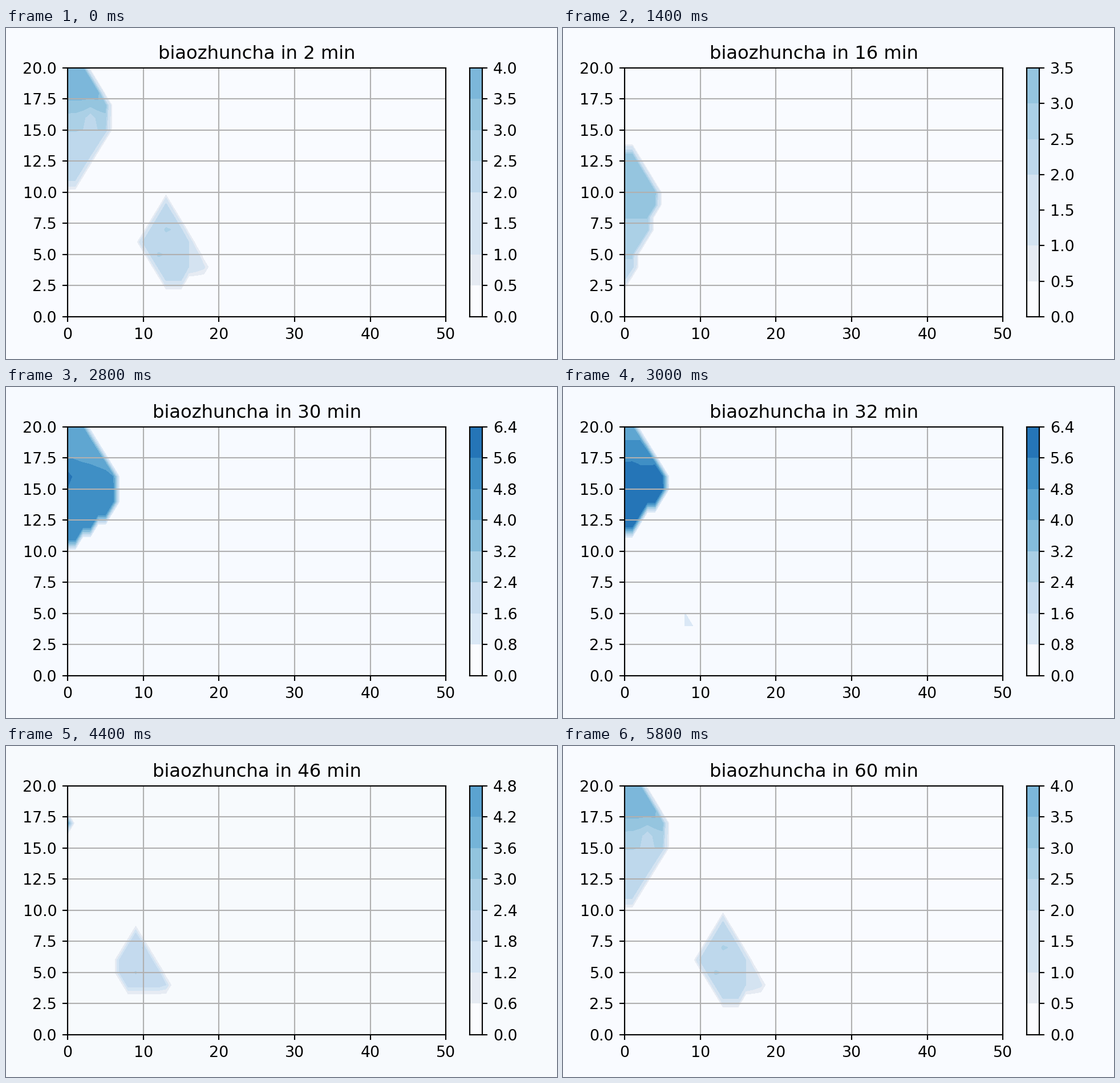
Write a matplotlib script that moves like this. It is 966x580 px and loops after 6000 ms.

```python
import numpy as np
import matplotlib.pyplot as plt
from matplotlib.animation import FuncAnimation
from matplotlib.ticker import MaxNLocator

W, H, DPI = 966, 580, 193.2
FRAMES, INTERVAL = 30, 200
VMAX = 8.2
BACKS = {0.5: "#f9fbff", 0.6: "#f7fafd", 0.8: "#f7faff"}

X, Y = np.meshgrid(np.arange(51), np.arange(21))

# minute: top, cap, bottom, slope, low, high, power, tilt, bump, bump x
WALL = {
    2: (22, 5, 10, 1, 2.1, 3.85, 3, 0, -0.7, 3),
    16: (14, 4, 2.38, 0.65, 1.8, 3.3, 0.6, 0, 0, 3),
    24: (22, 6, 8.85, 1.6, 3.3, 3.75, 2, 0.08, 0, 0),
    30: (22, 6, 10.5, 2, 5.5, 4.3, 4, -0.06, 0.7, 0),
    38: (19, 2, 14, 1, 4.5, 2.9, 1, 0.2, 0.5, 2),
    46: (18, 0, 16, 1, 4.3, 4.3, 1, 0, 0, 2),
}
# minute: left tip, its height, right diagonal, bottom, strength, ripple
DRIFT = {
    2: (10, 6, 22, 2.5, 2.2, 0.45),
    10: (7.5, 4.5, 13, 3.5, 0, 0),
    38: (7.5, 4.5, 13, 3.5, 0.9, 0),
    46: (6.5, 5.5, 17, 3.2, 2.2, 0.25),
}
for keys in (WALL, DRIFT):
    keys[60] = keys[2]


def at(keys, minute):
    return [np.interp(minute, list(keys), col) for col in zip(*keys.values())]


def wall_cloud(minute):
    """Cloud on the left edge: a capped wedge whose values rise with height."""
    top, cap, bottom, slope, low, high, power, tilt, bump, bx = at(WALL, minute)
    width = np.minimum(np.minimum(top - Y, cap), slope * (Y - bottom))
    inside = (Y > bottom) & (Y < top) & (X <= width + 1e-6)
    rise = np.clip((Y - bottom) / 8, 0, 1) ** power
    spot = bump * np.exp(-((X - bx) ** 2 + (Y - 16) ** 2) / 0.7)
    return inside * (low + (high - low) * rise + tilt * X + spot)


def drift_cloud(minute):
    """Free cloud: pointed on the left, cut by a diagonal on the right."""
    left, mid, diagonal, bottom, strength, ripple = at(DRIFT, minute)
    right = np.minimum(diagonal - Y, left + 2.5 + 5 * (Y - bottom))
    inside = ((Y > bottom) & (X >= left + abs(Y - mid) - 1e-6)
              & (X <= right + 1e-6))
    ridge = np.exp(-(X - left - 2.6 - 0.5 * (Y - 5.5)) ** 2)
    wave = ripple * ridge * np.cos(np.pi * (Y - 5.2) / 2) ** 2
    taper = 0.4 * np.maximum(0, X - left - 5.5)
    return inside * np.maximum(0, strength + wave - taper)


def cloud(minute):
    gain = np.interp(minute, [2, 8, 16, 30, 34, 38], [1, 0.53, 1, 1, 1.3, 1])
    return gain * np.maximum(wall_cloud(minute), drift_cloud(minute))


def bands(peak):
    levels = np.round(MaxNLocator(8, min_n_ticks=1).tick_values(0, peak), 6)
    levels = levels[:np.argmax(levels >= peak) + 1]
    step = round(levels[1], 3)
    mids = (levels[:-1] + levels[1:]) / 2
    colors = [tuple(c) for c in plt.cm.Blues(mids / VMAX)]
    back = BACKS.get(step, "#f8fbff")
    colors[0] = back
    if step in (0.5, 0.6):
        colors[1] = "#e6ebf3"
    if step == 0.5:
        colors[2] = colors[3] = "#d4e3f1"
    return levels, colors, back


def box(left, top, right, bottom):
    return [left / W, 1 - bottom / H, (right - left) / W, (bottom - top) / H]


# the small margin keeps the pixel size from rounding down
fig = plt.figure(figsize=((W + 0.01) / DPI, (H + 0.01) / DPI), dpi=DPI)
ax = fig.add_axes(box(108, 70, 771.4, 505.8))
cax = fig.add_axes(box(813, 70, 835, 505.8))


def draw(i):
    minute = 2 * (i + 1)
    z = cloud(minute)
    levels, colors, back = bands(z.max())
    fig.patch.set_facecolor(back)

    ax.clear()
    ax.set_facecolor(back)
    ax.contourf(z, levels=levels, colors=colors)
    ax.set(xlim=(0, 50), ylim=(0, 20), xticks=np.arange(0, 51, 10),
           yticks=np.arange(0, 20.1, 2.5))
    ax.grid(True)
    ax.set_title(f"biaozhuncha in {minute} min")

    cax.clear()
    for lo, hi, c in zip(levels, levels[1:], ["#fbfcff"] + colors[1:]):
        cax.axhspan(lo, hi, color=c, lw=0)
    cax.set(xlim=(0, 1), ylim=(0, levels[-1]), xticks=[], yticks=levels)
    cax.yaxis.tick_right()
    return []


anim = FuncAnimation(fig, draw, frames=FRAMES, interval=INTERVAL,
                     init_func=lambda: [], repeat=True, repeat_delay=0)
plt.show()
```
